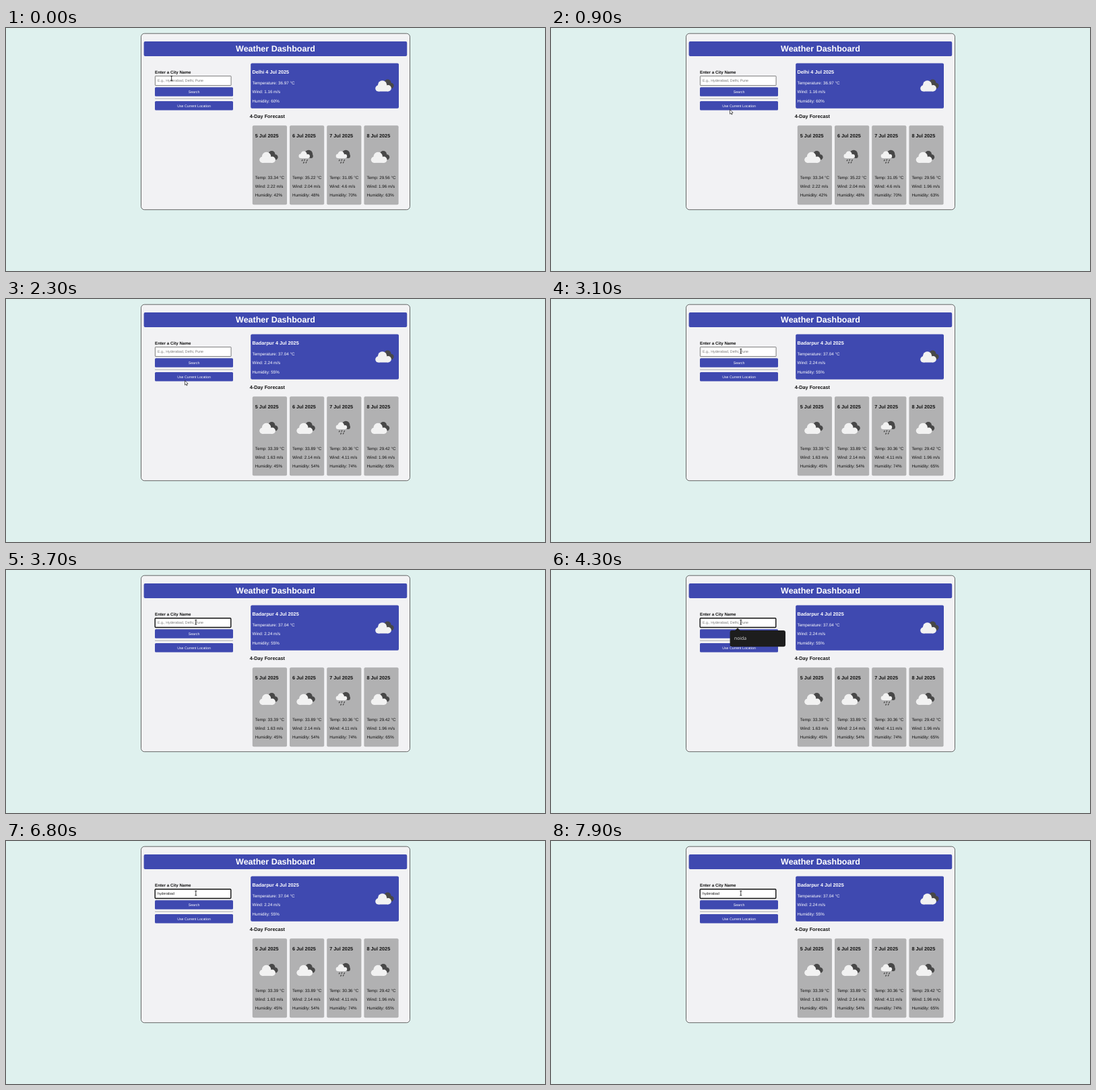
Animation of 800 by 362 pixels, one loop 8 s. Source, as an HTML page with a canvas:

```html
<!DOCTYPE html>
<html lang="en">
<head>
<meta charset="utf-8">
<title>Weather Dashboard</title>
<style>
html, body { margin: 0; width: 100%; height: 100%; overflow: hidden; background: #dff1ee; }
canvas { display: block; width: 800px; height: 362px; }
</style>
</head>
<body>
<canvas id="stage" width="800" height="362"></canvas>
<script>
const ctx = document.getElementById('stage').getContext('2d');
const LOOP = 8000, STEP = 100;
const BLUE = '#3f49b0', SANS = '"Liberation Sans", Arial, sans-serif';
const CARD_GAP = 55.2;

const delhi = {
  city: 'Delhi', now: ['36.97', '1.16', '60'],
  days: [['33.34', '2.22', '42', cloud], ['35.22', '2.04', '48', rain],
         ['31.05', '4.6', '70', rain], ['29.56', '1.96', '63', cloud]]
};
const badarpur = {
  city: 'Badarpur', now: ['37.04', '2.24', '55'],
  days: [['33.39', '1.63', '45', cloud], ['33.89', '2.14', '54', cloud],
         ['30.36', '4.11', '74', rain], ['29.42', '1.96', '65', cloud]]
};

function box(x, y, w, h, r, fill) {
  ctx.fillStyle = fill;
  ctx.beginPath();
  ctx.roundRect(x, y, w, h, r);
  ctx.fill();
}

function frame(x, y, w, h, r, color, width) {
  ctx.strokeStyle = color;
  ctx.lineWidth = width;
  ctx.beginPath();
  ctx.roundRect(x, y, w, h, r);
  ctx.stroke();
}

function text(str, x, y, size, color, weight = 'normal', align = 'left', family = SANS) {
  ctx.font = `${weight} ${size}px ${family}`;
  ctx.textAlign = align;
  ctx.fillStyle = color;
  ctx.fillText(str, x, y);
}

function puffs(color, ...circles) {
  ctx.fillStyle = color;
  for (const [x, y, r] of circles) {
    ctx.beginPath();
    ctx.arc(x, y, r, 0, Math.PI * 2);
    ctx.fill();
  }
}

// Icons are drawn around the centre of a 50 px tile.
function cloud(x, y) {
  ctx.save();
  ctx.translate(x, y);
  puffs('#484848', [3.6, -4, 5], [8.6, 0.4, 4.2], [4, 1, 4]);
  puffs('#f2f2f2', [-10, 4.3, 4.6], [-4.2, -0.6, 6.7], [4.4, 4.2, 4.7]);
  box(-10, 1.5, 14.4, 7.4, 0, '#f2f2f2');
  ctx.restore();
}

function rain(x, y) {
  ctx.save();
  ctx.translate(x, y);
  puffs('#484848', [3.2, -4.4, 5.9], [6.5, -1.2, 3.3]);
  puffs('#f2f2f2', [-8.2, -1.2, 3.3], [-4, -3.8, 4.7], [2, -0.9, 3]);
  box(-8.2, -3, 10.2, 5.1, 0, '#f2f2f2');
  ctx.strokeStyle = '#484848';
  ctx.lineWidth = 1.3;
  ctx.beginPath();
  for (const [dx, dy] of [[-6.5, 4], [-3, 3.6], [0.8, 4], [-4.2, 7.4], [-0.6, 7.2]]) {
    ctx.moveTo(dx + 0.7, dy);
    ctx.lineTo(dx - 0.5, dy + 2.2);
  }
  ctx.stroke();
  ctx.restore();
}

function button(label, y) {
  box(221, y, 116, 13.6, 1.5, BLUE);
  text(label, 279, y + 8.6, 5.25, '#fff', 'normal', 'center');
}

function readings([temp, wind, hum], name, x, top, color) {
  const lines = [`${name}: ${temp} °C`, `Wind: ${wind} m/s`, `Humidity: ${hum}%`];
  lines.forEach((line, i) => text(line, x, top + i * 13.3, 6.25, color));
}

function drawForm(t) {
  const focused = t >= 3700;
  const typed = 'hyderabad'.slice(0, Math.max(0, Math.floor((t - 4900) / 200)));
  text('Enter a City Name', 221, 68.3, 6.25, '#111', 'bold');
  box(221, 71.5, 113, 14.3, 0.5, '#fff');
  if (focused) frame(221.2, 71.8, 112.6, 13.7, 1, '#101010', 1.4);
  else frame(221.4, 71.6, 112.7, 14, 0.5, '#707070', 0.9);
  if (typed) text(typed, 225, 80.1, 5.25, '#111');
  else text('E.g., Hyderabad, Delhi, Pune', 225, 80.1, 5.25, '#757575');
  button('Search', 88.2);
  box(221, 104.7, 116, 0.8, 0, '#999');
  button('Use Current Location', 109);
}

function drawWeather(data) {
  box(363.2, 52.6, 219.8, 67.2, 2, BLUE);
  text(`${data.city} 4 Jul 2025`, 365.5, 68.4, 7.29, '#fff', 'bold');
  readings(data.now, 'Temperature', 365.5, 84, '#fff');
  cloud(562.8, 85.6);
  text('4-Day Forecast', 361.8, 133.8, 7.29, '#111', 'bold');
  data.days.forEach((day, i) => {
    const x = 365.8 + i * CARD_GAP;
    box(x, 145.2, 51.2, 118, 2, '#b1b1b2');
    text(`${5 + i} Jul 2025`, x + 4, 162.9, 7.29, '#111', 'bold');
    day[3](x + 25, 192);
    readings(day, 'Temp', x + 4, 224.7, '#111');
  });
}

function drawSuggestion() {
  box(265.6, 90, 82.4, 24.3, 3, '#1d1d1d');
  ctx.beginPath();
  ctx.moveTo(273, 90.2);
  ctx.lineTo(277, 86.2);
  ctx.lineTo(281, 90.2);
  ctx.fill();
  text('noida', 272, 104.4, 6.8, '#e4e4e4', 'normal', 'left', '"Open Sans", "Noto Sans", sans-serif');
}

function ease(t, from, to) {
  const p = Math.min(1, Math.max(0, (t - from) / (to - from)));
  return p * p * (3 - 2 * p);
}

function drawCursor(t) {
  const down = ease(t, 100, 800), up = ease(t, 2500, 3000);
  const x = 245.7 + 19.8 * down + 16.3 * up;
  const y = 75 + 46.5 * down - 43.8 * up;
  ctx.save();
  ctx.translate(x, y);
  ctx.beginPath();
  if (y > 71 && y < 86) {
    ctx.strokeStyle = '#222';
    ctx.lineWidth = 0.9;
    ctx.moveTo(-1.5, -3.3);
    ctx.lineTo(1.5, -3.3);
    ctx.moveTo(0, -3.3);
    ctx.lineTo(0, 3.3);
    ctx.moveTo(-1.5, 3.3);
    ctx.lineTo(1.5, 3.3);
    ctx.stroke();
  } else {
    const tip = [[0, 0], [0, 6.6], [1.5, 5.3], [2.5, 7.5], [3.6, 7], [2.6, 4.9], [4.7, 4.7]];
    tip.forEach(p => ctx.lineTo(...p));
    ctx.closePath();
    ctx.fillStyle = '#fff';
    ctx.fill();
    ctx.strokeStyle = '#222';
    ctx.lineWidth = 0.7;
    ctx.stroke();
  }
  ctx.restore();
}

function draw(t) {
  box(0, 0, 800, 362, 0, '#dff1ee');
  box(200.5, 8.2, 399, 262.5, 5, '#f2f2f4');
  frame(200.5, 8.2, 399, 262.5, 5, '#555', 0.9);
  box(204.6, 20, 390.6, 22, 2, BLUE);
  text('Weather Dashboard', 400, 35.4, 12.5, '#fff', 'bold', 'center');
  drawForm(t);
  drawWeather(t < 1500 ? delhi : badarpur);
  if (t >= 4100 && t < 4800) drawSuggestion();
  drawCursor(t);
}

ctx.textRendering = 'geometricPrecision';
const start = performance.now();
function tick() {
  const t = (performance.now() - start) % LOOP;
  draw(Math.floor(t / STEP) * STEP);
  requestAnimationFrame(tick);
}
tick();
</script>
</body>
</html>
```
